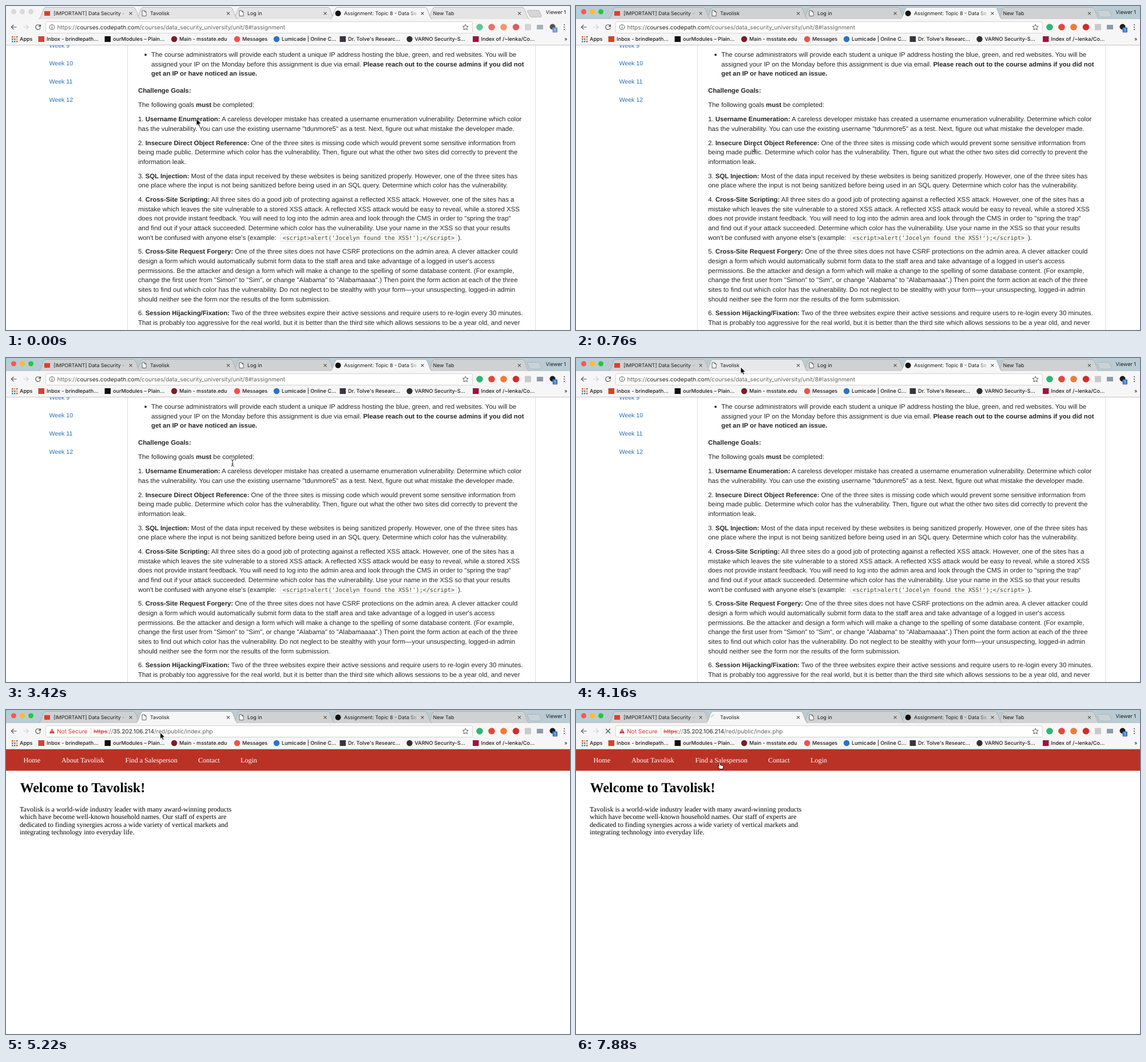
Write an HTML page that moves like this. It is 986 px wide and 568 px high and loops after 8000 ms.

```html
<!DOCTYPE html>
<html lang="en">
<head>
<meta charset="utf-8">
<title>Browser session</title>
<style>
  html, body { margin: 0; width: 100%; height: 100%; overflow: hidden; background: #fff; }
  svg { display: block; width: 100vw; height: 100vh; }
  text { white-space: pre; text-rendering: geometricPrecision; }
  .ui { font-family: Inter, Roboto, sans-serif; font-size: 9.2px; fill: #1a1a1a; }
  .tab { font-size: 8.9px; }
  .mark { font-size: 9.05px; font-weight: 500; }
  .url { font-size: 10.1px; fill: #636363; }
  .host { fill: #222; }
  .alert { fill: #c53a2b; }
  .body { font-family: "Liberation Sans", Arial, sans-serif; font-size: 11.44px; fill: #262626; }
  .body .bold { font-weight: bold; font-size: 11.32px; }
  .week { font-size: 10.6px; fill: #2b70ad; }
  .code { font-family: "DejaVu Sans Mono", monospace; font-size: 10.2px; fill: #3a4a25; }
  .serif { font-family: "Liberation Serif", Times, serif; font-size: 12.1px; fill: #000; }
  .nav { fill: #fff; }
  .title { font-size: 24px; font-weight: bold; }
  .line { fill: none; stroke: #555; stroke-width: 1.2; }
</style>
</head>
<body>
<svg id="stage" viewBox="0 0 986 568" preserveAspectRatio="none"></svg>
<script>
const LOOP = 8000, TICK = 148.8;
const stage = document.getElementById('stage');

const esc = s => s.replace(/&/g, '&amp;').replace(/</g, '&lt;');
const text = (x, y, cls, s, extra = '') => `<text x="${x}" y="${y}" class="${cls}" ${extra}>${esc(s)}</text>`;
const rect = (x, y, w, h, fill, extra = '') => `<rect x="${x}" y="${y}" width="${w}" height="${h}" fill="${fill}" ${extra}/>`;
const dot = (x, y, r, fill, extra = '') => `<circle cx="${x}" cy="${y}" r="${r}" fill="${fill}" ${extra}/>`;
const line = (d, extra = '') => `<path class="line" d="${d}" ${extra}/>`;
const group = (id, ...parts) => `<g id="${id}">${parts.join('')}</g>`;

// Lines of running text; *stars* mark bold runs.
const prose = (x, y, ...lines) => lines.map((s, i) =>
  `<text x="${x}" y="${y + i * 16.7}" class="body">` + s.split('*').map((run, k) =>
    k % 2 ? `<tspan class="bold">${esc(run)}</tspan>` : esc(run)).join('') + '</text>').join('');

const tabShape = 'M-3,23 C2,22 4,2.5 9,2.5 H163 C168,2.5 170,22 175,23';
const tabX = i => 60 + 170 * i;
const pageIcon = x => `<path d="M${x},8 h4.5 l2.5,2.5 v7 h-7z M${x + 4.5},8 v2.5 h2.5" fill="#fff" stroke="#555" stroke-width=".9"/>`;
const cross = (x, y, r, extra) => line(`M${x - r},${y - r} l${2 * r},${2 * r} m0,${-2 * r} l${-2 * r},${2 * r}`, extra);
const fade = (id, from, to) => `<linearGradient id="${id}" gradientUnits="userSpaceOnUse" x1="${from}" x2="${to}" y1="0" y2="0">
  <stop stop-color="#1a1a1a"/><stop offset="1" stop-color="#1a1a1a" stop-opacity="0"/></linearGradient>`;

const tabs = [0, 1, 2, 3, 4];
const tabStrip = [
  `<defs>${fade('fadeMail', 199, 213)}${fade('fadeTask', 704, 721)}</defs>`,
  rect(0, 0, 986, 23, '#f5f5f5', 'id="strip"'),
  ...[13.5, 28.5, 43.5].map(x => dot(x, 10, 4.5, '#ddd', 'class="light"')),
  ...tabs.slice().reverse().map(i => `<path class="back" d="${tabShape}" transform="translate(${tabX(i)})" stroke="#a5a9ab" stroke-width=".8"/>`),
  '<path id="plus" d="M912,7.5 h18 q2,0 3,2 l3,7.5 q.5,2.5 -1.5,2.5 h-16 q-2,0 -3,-2 l-4,-8 q-.5,-2 .5,-2z" stroke="#a5a9ab" stroke-width=".7"/>',
  `<path id="front" d="${tabShape}" fill="#f6f6f6" stroke="#a5a9ab" stroke-width=".8"/>`,
  rect(67, 9, 10, 8, '#d8402f'),
  group('docIcon', pageIcon(238)),
  line('M-4.5,0 A4.5,4.5 0 0 1 0,-4.5', 'id="spinner" style="stroke:#a9bfe0"'),
  pageIcon(408),
  dot(580.5, 13, 5, '#111'),
  text(83, 16, 'ui tab', '[IMPORTANT] Data Security - ', 'style="fill:url(#fadeMail)"'),
  text(252, 16, 'ui tab', 'Tavolisk'),
  text(422, 16, 'ui tab', 'Log in'),
  text(591, 16, 'ui tab', 'Assignment: Topic 8 - Data Se', 'style="fill:url(#fadeTask)"'),
  text(746.5, 16, 'ui tab', 'New Tab'),
  ...[218, 388.5, 558, 728, 897.5].map(x => cross(x, 13, 2.4, 'style="stroke-width:1.1"')),
  text(943.5, 13.5, 'ui', 'Viewer 1', 'style="font-size:9px"')
];

const bookmarks = [
  [71, 'Inbox - brindlepath...', '#d8402f', 'square'], [187, 'ourModules – Plain...', '#111', 'square'],
  [303, 'Main - msstate.edu', '#7b1d28', 'round'], [413, 'Messages', '#f0504f', 'round'],
  [482, 'Lumicade | Online C...', '#2a73cc', 'round'], [598, "Dr. Tolve's Researc...", '#3b3440', 'square'],
  [714.5, 'VARNO Security-S...', '#333', 'round'], [830.5, 'Index of /~lenka/Co...', '#a3123f', 'square']
];
const extensions = [[828, '#2fb573'], [849, '#e0483a'], [870, '#f0793a'], [891.5, '#d02c2c']];
const appColors = ['#e0483a', '#f0a030', '#3a9a55', '#3f78d0'];

const toolbar = [
  rect(0, 23, 986, 45.5, '#f6f6f6'),
  rect(0, 68, 986, 1, '#c4c4c4'),
  rect(69.5, 27.5, 746, 20, '#fff', 'rx="2" stroke="#d2d2d2"'),
  line('M18.5,37 H9.5 m4,-4.2 l-4.2,4.2 l4.2,4.2'),
  line('M30,37 h9 m-4,-4.2 l4.2,4.2 l-4.2,4.2', 'style="stroke:#d0d0d0"'),
  group('reload', line('M59.6,34.6 A4.3,4.3 0 1 0 60.2,38.2'), '<path d="M61,32 v4.6 h-4.6z" fill="#555"/>'),
  group('stop', cross(56, 37, 3.9, 'style="stroke-width:1.4"')),
  group('taskUrl',
    dot(80.5, 37, 4.3, 'none', 'stroke="#555"'), line('M80.5,36.4 v3 m0,-4.9 v1.1'),
    `<text x="89.5" y="41" class="ui url">https://<tspan class="host">courses.codepath.com</tspan>/courses/data_security_university/unit/8#!assignment</text>`),
  group('siteUrl',
    '<path d="M80.5,32.6 l4.7,8.4 h-9.4z" fill="#c53a2b"/>', line('M80.5,35.6 v2.6 m0,.8 v1', 'style="stroke:#fff;stroke-width:1"'),
    text(89, 41, 'ui url', 'Not Secure', 'style="fill:#c53a2b"'),
    rect(148, 31, 1, 13, '#d5d5d5'),
    `<text x="153" y="41" class="ui url"><tspan class="alert" text-decoration="line-through">https</tspan>://<tspan class="host">35.202.106.214</tspan>/red/public/index.php</text>`),
  line('M803.2,32.3 l1.5,3.2 3.5,.4 -2.6,2.4 .7,3.5 -3.1,-1.8 -3.1,1.8 .7,-3.5 -2.6,-2.4 3.5,-.4z', 'style="stroke-width:1"'),
  group('extensions',
    ...extensions.map(([x, c]) => dot(x, 37, 5.8, c)),
    rect(907, 31.5, 11, 11, '#c9c9c9', 'rx="1"'),
    rect(928, 33, 11, 8, '#8f9aa5'),
    dot(955.5, 36.5, 5, '#1c1c1c'),
    rect(955.5, 37.5, 8.5, 9, '#3f78d8', 'rx="1.2"'),
    text(958, 44.8, 'ui', '1', 'style="font-size:7.5px;fill:#fff"')),
  ...[33, 37, 41].map(y => dot(976, y, 1.1, '#555')),
  ...tabs.concat(5, 6, 7, 8).map(i => rect(10 + i % 3 * 4, 53 + Math.floor(i / 3) * 4, 2.5, 2.5, appColors[i % 4])),
  text(24, 61.3, 'ui mark', 'Apps'),
  ...bookmarks.map(([x, label, color, kind]) =>
    (kind === 'round' ? dot(x - 9, 58, 5.2, color) : rect(x - 14.5, 53, 10.5, 10, color)) + text(x, 61.3, 'ui mark', label)),
  text(976, 61.3, 'ui', '»')
];

const taskPage = group('taskPage',
  rect(212, 69, 1, 499, '#ddd'), rect(925, 69, 1, 499, '#ddd'),
  ...[9, 10, 11, 12].map((n, i) => text(75.5, 72.6 + 31.7 * i, 'body week', 'Week ' + n)),
  dot(244, 85.5, 1.9, '#262626'),
  prose(254, 89, 'The course administrators will provide each student a unique IP address hosting the blue, green, and red websites. You will be',
    'assigned your IP on the Monday before this assignment is due via email. *Please reach out to the course admins if you did not*',
    '*get an IP or have noticed an issue.*'),
  prose(231, 152, '*Challenge Goals:*'),
  prose(231, 177, 'The following goals *must* be completed:'),
  prose(231, 202, '1. *Username Enumeration:* A careless developer mistake has created a username enumeration vulnerability. Determine which color',
    'has the vulnerability. You can use the existing username "tdunmore5" as a test. Next, figure out what mistake the developer made.'),
  prose(231, 243.5, '2. *Insecure Direct Object Reference:* One of the three sites is missing code which would prevent some sensitive information from',
    'being made public. Determine which color has the vulnerability. Then, figure out what the other two sites did correctly to prevent the',
    'information leak.'),
  prose(231, 301.5, '3. *SQL Injection:* Most of the data input received by these websites is being sanitized properly. However, one of the three sites has',
    'one place where the input is not being sanitized before being used in an SQL query. Determine which color has the vulnerability.'),
  prose(231, 343, '4. *Cross-Site Scripting:* All three sites do a good job of protecting against a reflected XSS attack. However, one of the sites has a',
    'mistake which leaves the site vulnerable to a stored XSS attack. A reflected XSS attack would be easy to reveal, while a stored XSS',
    'does not provide instant feedback. You will need to log into the admin area and look through the CMS in order to "spring the trap"',
    'and find out if your attack succeeded. Determine which color has the vulnerability. Use your name in the XSS so that your results',
    "won't be confused with anyone else's (example: "),
  rect(479.5, 399.5, 309, 13, '#fafafa', 'rx="2" stroke="#ddd"'),
  text(483.5, 409.6, 'code', "<script>alert('Jocelyn found the XSS!');<\/script>"),
  prose(790, 409.8, ').'),
  prose(231, 434.3, '5. *Cross-Site Request Forgery:* One of the three sites does not have CSRF protections on the admin area. A clever attacker could',
    "design a form which would automatically submit form data to the staff area and take advantage of a logged in user's access",
    'permissions. Be the attacker and design a form which will make a change to the spelling of some database content. (For example,',
    'change the first user from "Simon" to "Sim", or change "Alabama" to "Alabamaaaa".) Then point the form action at each of the three',
    'sites to find out which color has the vulnerability. Do not neglect to be stealthy with your form—your unsuspecting, logged-in admin',
    'should neither see the form nor the results of the form submission.'),
  prose(231, 542.4, '6. *Session Hijacking/Fixation:* Two of the three websites expire their active sessions and require users to re-login every 30 minutes.',
    'That is probably too aggressive for the real world, but it is better than the third site which allows sessions to be a year old, and never',
    'regenerates the session IDs even when the user agent string changes. This makes it vulnerable to both session hijacking and'));

const menu = [[30.5, 'Home'], [97, 'About Tavolisk'], [208.5, 'Find a Salesperson'], [336, 'Contact'], [410, 'Login']];
const sitePage = group('sitePage',
  rect(0, 69, 986, 37.5, '#ba3225'),
  ...menu.map(([x, s]) => text(x, 92.3, 'serif nav', s)),
  text(24.5, 144.3, 'serif title', 'Welcome to Tavolisk!'),
  ...['Tavolisk is a world-wide industry leader with many award-winning products',
    'which have become well-known household names. Our staff of experts are',
    'dedicated to finding synergies across a wide variety of vertical markets and',
    'integrating technology into everyday life.'].map((s, i) => text(24, 177.6 + 13.6 * i, 'serif', s)));

const cursors = group('cursor',
  '<path id="arrow" d="M0,0 V11.5 l2.6,-2.4 1.8,4.1 1.9,-.9 -1.8,-3.9 h3.6z" fill="#000" stroke="#fff" stroke-width=".8"/>',
  line('M-2.5,-5.5 q2.5,0 2.5,1.5 v8 q0,1.5 -2.5,1.5 M2.5,-5.5 q-2.5,0 -2.5,1.5 M0,4 q0,1.5 2.5,1.5 M-1.5,2 h3', 'id="beam" style="stroke:#222;stroke-width:1"'),
  '<path id="hand" d="M-1.2,1 q1.2,-1.8 2.3,0 v3.4 l4.4,1.1 q1.4,.4 1.2,2 l-.9,4 h-5.7 l-3.3,-4.4 q0,-1.6 2,-.1z" fill="#fff" stroke="#000" stroke-width=".9"/>');

stage.innerHTML = [rect(0, 0, 986, 568, '#fff'), taskPage, sitePage, ...tabStrip, ...toolbar, cursors].join('');

// Pointer path: [tick, x, y]
const path = [[0, 333, 198], [2, 331, 212], [5, 312, 250], [6, 320, 257], [7, 346, 250], [8, 312, 240],
  [9, 291, 231], [10, 291, 231], [13, 326, 237], [15, 326, 237], [16, 349, 238], [20, 426, 238], [22, 426, 238],
  [24, 366, 130], [26, 306, 40], [28, 288, 16], [30, 288, 16], [36, 266, 44], [40, 251, 92], [54, 251, 92]];

function pointerAt(tick) {
  const i = path.findIndex(p => p[0] > tick);
  const [t0, x0, y0] = path[i - 1], [t1, x1, y1] = path[i];
  const k = (tick - t0) / (t1 - t0);
  return [x0 + (x1 - x0) * k, y0 + (y1 - y0) * k];
}

const byId = id => document.getElementById(id);
const show = (id, on) => byId(id).setAttribute('visibility', on ? 'visible' : 'hidden');
const backTabs = [...document.querySelectorAll('.back')].reverse();
const lights = [...document.querySelectorAll('.light')];

function draw(time) {
  const tick = Math.min(53, Math.floor((time % LOOP + 14) / TICK));
  const focused = tick >= 2, onSite = tick >= 30, loading = tick >= 43;
  const [x, y] = pointerAt(tick);

  byId('strip').setAttribute('fill', focused ? '#b9ccd5' : '#f5f5f5');
  byId('plus').setAttribute('fill', focused ? '#c8d2d7' : '#d6d6d6');
  byId('extensions').setAttribute('opacity', focused ? 1 : 0.75);
  byId('front').setAttribute('transform', `translate(${tabX(onSite ? 1 : 3)})`);
  backTabs.forEach((tab, i) => {
    const hovered = i === 1 && !onSite && tick > 20 && y < 23;
    tab.setAttribute('fill', hovered ? '#e6e8e9' : focused ? '#cfd1d2' : '#e4e4e4');
  });
  lights.forEach((light, i) => light.setAttribute('fill', focused ? ['#fc5650', '#fdbc2f', '#29c53f'][i] : '#d9d9d9'));

  show('taskPage', !onSite);
  show('taskUrl', !onSite);
  show('sitePage', onSite);
  show('siteUrl', onSite);
  show('reload', !loading);
  show('stop', loading);
  show('docIcon', !loading);
  show('spinner', loading);
  byId('spinner').setAttribute('transform', `translate(241.5 13) rotate(${(53 - tick) * 30})`);

  const shape = tick < 3 ? 'arrow' : tick < 24 ? 'beam' : onSite && y > 69 ? 'hand' : 'arrow';
  ['arrow', 'beam', 'hand'].forEach(id => show(id, id === shape));
  byId('cursor').setAttribute('transform', `translate(${x} ${y})`);
}

function loop() {
  draw(performance.now());
  requestAnimationFrame(loop);
}
loop();
</script>
</body>
</html>
```
